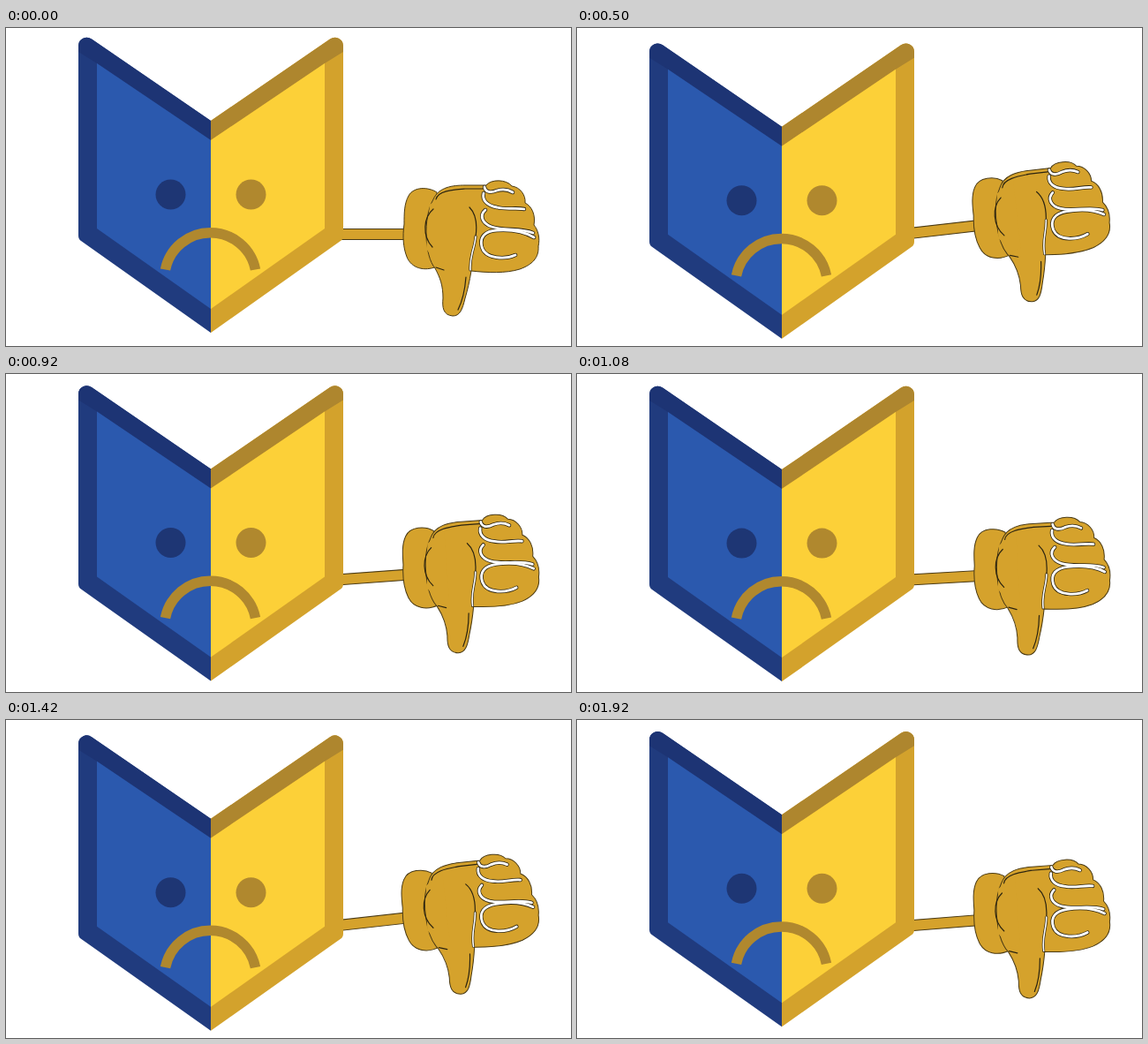
Animation, 640 px wide and 360 px high, one loop 2010 ms. Source, as an HTML page:

```html
<!DOCTYPE html>
<html lang="en">
<head>
<meta charset="utf-8">
<title>Thumbs down</title>
<style>
  html, body { margin: 0; width: 100%; height: 100%; overflow: hidden; background: #fff; }
  svg { display: block; width: 100vw; height: 100vh; }
  .skin { fill: #d5a22c; stroke: #4a3a14; }
  .line { fill: none; stroke: #2c2410; stroke-width: 1.2; stroke-linecap: round; }
  .gap { fill: none; stroke: #fff; stroke-width: 2.8; stroke-linecap: round; }
  .rim { fill: none; stroke: #2c2410; stroke-width: 4.4; stroke-linecap: round; }
</style>
</head>
<body>
<svg viewBox="0 0 640 360">
  <defs>
    <g id="gaps">
      <path d="M542 180C543 186 549 187 556 184C563 182 569 183 574 186"/>
      <path d="M541 187C539 195 545 201 556 203C567 206 577 203 587 205"/>
      <path d="M543 206C536 212 539 221 550 225C564 230 583 226 597 232"/>
      <path d="M577 257C566 262 543 262 539 248C536 236 543 230 556 229C572 228 588 231 598 237"/>
    </g>
    <path id="palm" d="M532 236C531 250 525 257 526 274"/>
  </defs>

  <g id="arm">
    <path class="skin" d="M368 227.5H460V239.5H368Z"/>
    <path class="skin" d="M488 186C479 180 462 179 456 190C451 199 451 210 451 222C449 236 450 249 454 259C459 272 474 276 488 270Z"/>
    <path class="skin" d="M484 194C490 180 506 178 520 178L544 178C549 171 567 171 573 179C582 180 589 189 588 198C596 202 600 212 598 223C603 229 605 238 603 247C604 260 596 268 582 273C566 278 545 277 527 275C525 287 523 296 520 306C517 319 514 326 506 326C495 325 494 316 495 306C495 292 492 283 486 272C474 258 472 215 484 194Z"/>
    <path d="M480 200L500 186V265L488 267L476 250Z" fill="#d5a22c"/>
    <path class="line" d="M487 194C489 184 507 183 520 182L540 182"/>
    <path class="line" d="M484 205C473 214 471 235 483 248"/>
    <path class="line" d="M525 203C533 211 534 222 532 236M487 271L496 274M521 282C520 295 517 309 512 319"/>
    <use href="#gaps" class="rim"/>
    <use href="#gaps" class="gap"/>
    <use href="#palm" class="rim" style="stroke-width: 3"/>
    <use href="#palm" class="gap" style="stroke-width: 1.6"/>
  </g>

  <g id="book">
    <path fill="#203b7e" d="M82 20A9.5 9.5 0 0 1 97 12.5L232 105V345L85 241Q82 239 82 235Z"/>
    <path fill="#1d3474" d="M82 27V20A9.5 9.5 0 0 1 97 12.5L232 105V127L103 40Z"/>
    <path fill="#2b59ae" d="M103 40L232 127V318L103 227Z"/>
    <path fill="#d3a22c" d="M382 20A9.5 9.5 0 0 0 367 12.5L232 105V345L379 241Q382 239 382 235Z"/>
    <path fill="#ae862e" d="M382 27V20A9.5 9.5 0 0 0 367 12.5L232 105V127L361 40Z"/>
    <path fill="#fcd038" d="M361 40L232 127V318L361 227Z"/>
    <circle cx="186.5" cy="188.5" r="17" fill="#1e3674"/>
    <circle cx="277.5" cy="188.5" r="17" fill="#b0882e"/>
    <path d="M180.5 273.5A52 52 0 0 1 282.5 273.5" fill="none" stroke="#b0882e" stroke-width="11.5"/>
  </g>
</svg>
<script>
  const LOOP = 2010, STEP = 2000 / 24;
  const book = document.getElementById("book");
  const arm = document.getElementById("arm");

  // Bounce between 0 and 1; period is in steps, a small power gives a sharp turn at 0.
  const bounce = (step, period, power) => Math.abs(Math.sin(Math.PI * step / period)) ** power;

  function draw(now) {
    const t = Math.floor((now % LOOP) / 10) * 10;
    const step = Math.min(23, Math.floor((t + 5) / STEP));
    book.setAttribute("transform", `translate(0 ${6.8 * bounce(step, 11.85, 0.65)})`);
    arm.setAttribute("transform", `rotate(${-6.5 * bounce(step, 12.3, 0.4)} 368 233)`);
  }

  const start = performance.now();
  function tick() {
    draw(performance.now() - start);
    requestAnimationFrame(tick);
  }
  tick();
</script>
</body>
</html>
```
